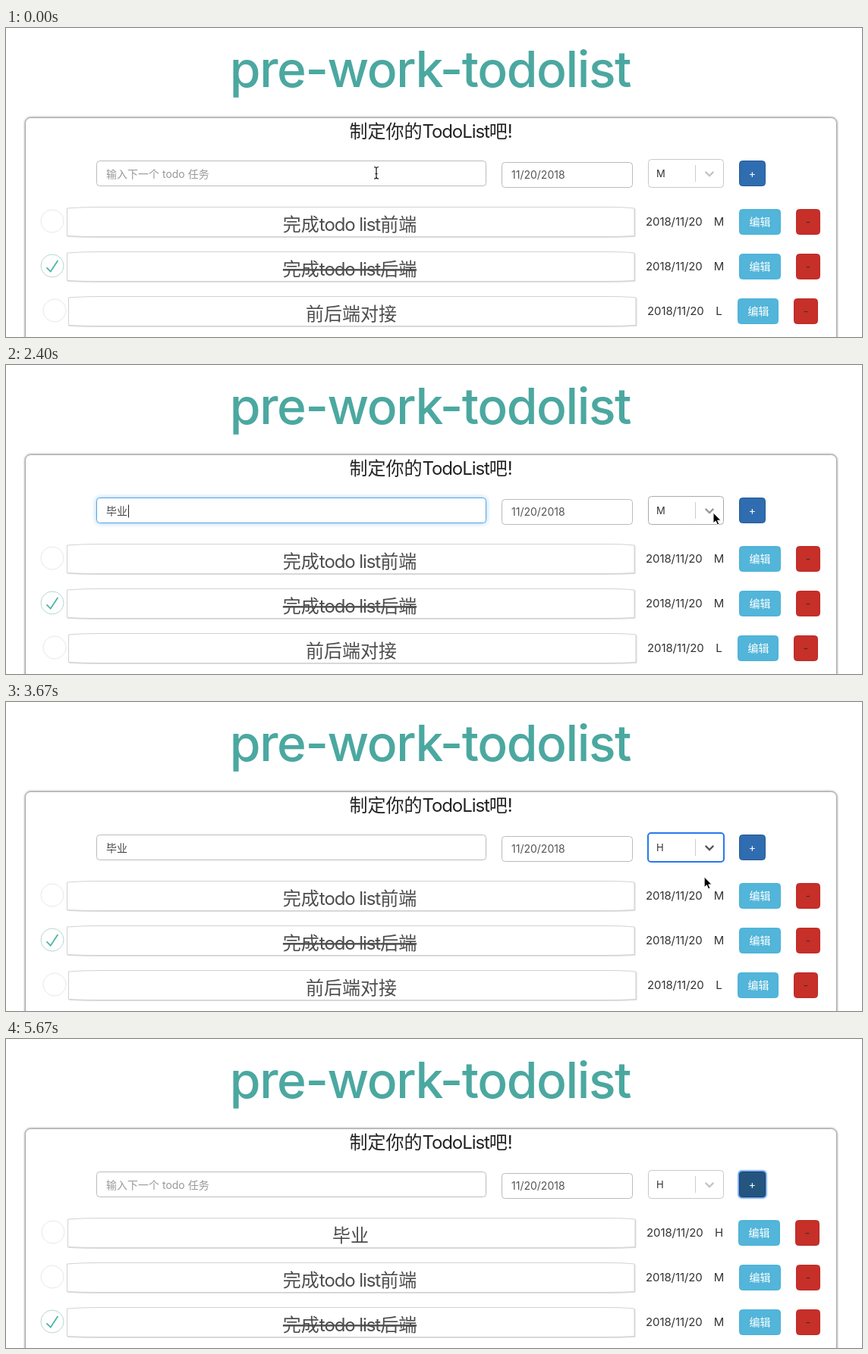
These frames come from a looping animation (1128x408 px, 5.74 s). An HTML page:

```html
<!DOCTYPE html>
<html lang="zh-CN">
<head>
<meta charset="utf-8">
<title>pre-work-todolist</title>
<style>
  html, body { margin: 0; width: 100%; height: 100%; overflow: hidden; background: #fff; }
  svg { display: block; font-family: Inter, "Noto Sans CJK SC", "Noto Sans CJK", sans-serif; }
  .big tspan { letter-spacing: -.045em; }
  .card { filter: drop-shadow(1px 1px .5px #0002); }
  .panel { filter: drop-shadow(0 0 1.5px #0008); }
  .popup { filter: drop-shadow(0 3px 5px #0006); }
  .menu { filter: drop-shadow(0 2px 2px #0003); }
  .focus { filter: drop-shadow(0 0 3px #52a8ec99); }
  .ring { filter: drop-shadow(0 0 1px #4d90fe88); }
</style>
</head>
<body>
<svg id="stage" width="1128" height="408" viewBox="0 0 1128 408"></svg>
<script>
const LOOP = 5740, FPS = 15;
const TEAL = '#4ba8a0', INK = '#333';
const FOCUS = 330, OPEN = 2530, PICK = 3460, PRESS = 4460, ADD = 4590, LEAVE = 5520;

// [time, input text, caret x, candidates]; V and N are pictograms
const typing = [
  [0, '', 132.5],
  [730, 'b', 141, '不 吧 把 被 比 部 本 并 别'],
  [870, 'bi', 144.5, '比 V 逼 必 笔 闭 鼻 N 碧'],
  [1070, 'bi y', 156.5, '毕业 比 必 笔 闭 鼻 碧'],
  [1200, 'bi ye', 165, '毕业 比 必 笔 闭 鼻 碧'],
  [1330, '毕业', 161.5],
  [ADD, '', 132.5]
];

// [time, x, y] of the pointer tip
const pointer = [
  [0, 488, 191], [1400, 488, 191], [1530, 510, 193], [1670, 510, 193],
  [2270, 932, 195], [2730, 932, 195], [3070, 908, 237], [3530, 908, 237],
  [4070, 984, 198], [LOOP, 984, 198]
];

const text = (x, y, size, s, fill = INK, extra = '') =>
  `<text x="${x}" y="${y}" font-size="${size}" fill="${fill}" ${extra}>${s}</text>`;
const mid = (x, y, size, s, fill, extra = '') =>
  text(x, y, size, s, fill, 'text-anchor="middle" ' + extra);
const big = (x, y, s, fill, extra = '') =>
  mid(x, y, 24, s.replace(/[ -~]+/g, '<tspan>$&</tspan>'), fill, 'class="big" ' + extra);
const rect = (x, y, w, h, fill, stroke = 'none', r = 4, extra = '') =>
  `<rect x="${x}" y="${y}" width="${w}" height="${h}" rx="${r}" fill="${fill}" stroke="${stroke}" ${extra}/>`;
const path = (d, stroke, width = 1, fill = 'none', extra = '') =>
  `<path d="${d}" fill="${fill}" stroke="${stroke}" stroke-width="${width}" ${extra}/>`;
const chevron = (x, y, size, color, width) =>
  path(`M${x - size} ${y - size / 2}l${size} ${size} ${size} ${-size}`, color, width);

function pointerAt(t) {
  const i = pointer.findIndex(k => k[0] > t);
  const [t0, x0, y0] = pointer[i - 1], [t1, x1, y1] = pointer[i];
  const p = (t - t0) / (t1 - t0), e = p * p * (3 - 2 * p);
  return [x0 + (x1 - x0) * e, y0 + (y1 - y0) * e];
}

function cursor(x, y) {
  const at = `transform="translate(${x} ${y})"`;
  if (x >= 966 && y > 175)
    return path('M-1.5 1Q0-1 1.5 1V7Q3 5.5 4.4 7.2 6 6 7 8 9 7.5 9.3 9.5V12Q9 14 7.5 16.5H0L-1 14-4.5 9Q-3.5 7-1.5 9Z',
      '#111', 1.1, '#fff', at);
  const overText = x < 633 || (x > 653 && x < 826);
  if (overText)
    return path('M-3-7.5Q0-7.5 0-5.5 0-7.5 3-7.5M0-5.5V6M-3 8Q0 8 0 6 0 8 3 8M-1.5 1.5H1.5', '#111', 1.2, 'none', at);
  return path('M0 0V14L3.2 11 5.4 16 7.8 15 5.6 10.2H10Z', '#fff', 1, '#000', at);
}

function row(i, title, size, done) {
  const d = { M: 0, H: 1, L: 2 }[size], wide = Math.floor(d * 1.5);
  return `<g transform="translate(0 ${i * 59})">` +
    `<circle cx="${61 + wide}" cy="255" r="15" fill="none" stroke="${done ? '#b5d8d2' : '#e8e8e8'}"/>` +
    (done ? path('M72 25L42 71 27 56l-4 4 20 20 34-52z', 'none', 0, '#4fb3a5', 'transform="translate(46 240) scale(.3)"') : '') +
    path('M80.5 238Q100 236.5 120 236.5H790Q815 236.5 828 238V274.5Q810 275.5 790 275.5H120Q100 275.5 80.5 274.5Z',
      '#d2d2d2', 1, '#fff', `class="card" transform="translate(${d} 0)"`) +
    big(453 + d, 268, title, '#4d4d4d', done ? 'text-decoration="line-through"' : '') +
    text(843 + d, 261, 15, '2018/11/20', INK, 'letter-spacing="-.1"') +
    mid(939.5, 261, 15, size) +
    rect(966.5 - d, 239.5, 54 - (d >> 1), 33, '#52b5d9', '#4bb2d7') +
    mid(993.5 - d, 261, 14, '编辑', '#fff') +
    rect(1041.5 - wide, 239.5, 31, 33, '#c72f29', '#b92c27') +
    mid(1057 - wide, 261, 14, '-') + '</g>';
}

function candidates(list) {
  const words = list.split(' ');
  let x = 121, items = '';
  words.forEach((word, i) => {
    items += text(x, 224, 11, i + 1, '#777');
    if (word === 'V') {
      items += rect(x + 11, 209.5, 20, 20, '#f08a24', '#d9741a') +
        mid(x + 21, 224, 11, 'VS', '#fff', 'font-weight="700"');
    } else if (word === 'N') {
      items += path(`M${x + 19} 211Q${x + 21} 208 ${x + 23} 211L${x + 24} 219Q${x + 30} 224 ${x + 27} 228H${x + 15}Q${x + 12} 224 ${x + 18} 219Z`,
        '#e5a52c', 1, '#fbc94a');
    } else items += text(x + 10, 226, 16, word, '#111');
    x += word === 'V' ? 45 : word === 'N' ? 44 : 23 + 16 * word.length;
  });
  return rect(114, 207, x - 89, 27, '#fff', 'none', 5, 'class="popup"') +
    rect(118.5, 210.5, 17 + 16 * words[0].length, 20, '#d3e6fb', '#b9d4f3', 3) +
    items + chevron(x + 11, 220, 4.5, '#888', 1.3);
}

function menu(y) {
  const hoverH = y > 223 && y < 257;
  return rect(845.5, 219.5, 101, 110, '#fff', '#ddd', 4, 'class="menu"') +
    (hoverH ? rect(846, 223, 100, 34, '#a5c9fa', 'none', 0) : '') +
    rect(846, 257, 100, 34, '#2076f8', 'none', 0) +
    [...'HML'].map((s, i) => mid(896, 245 + 34 * i, 13, s, s === 'M' ? '#fff' : INK)).join('');
}

function scene(t) {
  const [x, y] = pointerAt(t);
  const [, value, caret, words] = typing.filter(k => k[0] <= t).pop();
  const inputFocus = t >= FOCUS && t < OPEN;
  const selectFocus = t >= OPEN && t < PRESS;
  const overSelect = x > 846 && x < 946 && y < 211;
  const pressed = t >= PRESS, overButton = x >= 966;
  const hidden = (t >= 730 && t < 1400) || t >= LEAVE;

  const rows = [['完成todo list前端', 'M'], ['完成todo list后端', 'M', true], ['前后端对接', 'L']];
  if (t >= ADD) rows.unshift(['毕业', 'H']);

  return mid(559, 78, 66, 'pre-work-todolist', TEAL, 'font-weight="500" letter-spacing="-1.4"') +
    rect(25.5, 118.5, 1069, 320, '#fff', '#aaa', 7, 'class="panel"') +
    big(559.5, 145, '制定你的TodoList吧!', '#222') +
    rect(119.5, 175.5, 513, 33, '#fff', inputFocus ? '#5aa5dc' : '#bbb', 4, inputFocus ? 'class="focus"' : '') +
    (value
      ? text(132, 198, 14, value, '#444', words ? 'text-decoration="underline"' : '')
      : text(132, 198, 14, '输入下一个 todo 任务', '#999')) +
    (inputFocus ? path(`M${caret} 184.5V201.5`, '#222') : '') +
    rect(653.5, 177.5, 172, 33, '#fff', '#bbb') +
    text(666, 199, 14, '11/20/2018', '#555') +
    (selectFocus
      ? rect(846, 173, 100, 38, '#fff', '#2579ee', 4, 'stroke-width="2"')
      : rect(846.5, 173.5, 99, 37, '#fff', overSelect ? '#aaa' : '#c8c8c8')) +
    text(857, 197, 13, t < PICK ? 'M' : 'H') +
    path('M908.5 181V203', '#ccc') +
    chevron(927, 192.5, 5.3, selectFocus ? '#555' : overSelect ? '#999' : '#c4c4c4', 2.2) +
    (pressed ? rect(965.5, 174.5, 36, 35, '#22527f', '#6fa8f5', 4, 'stroke-width="2" class="ring"') : '') +
    (pressed || overButton
      ? rect(966.5, 175.5, 34, 33, '#24557f', '#1d4469')
      : rect(966.5, 175.5, 34, 33, '#2f6cb0', '#265a95')) +
    mid(983.5, 197, 14, '+', '#fff') +
    rows.slice(0, 3).map((r, i) => row(i, ...r)).join('') +
    (words ? candidates(words) : '') +
    (t >= OPEN && t < PICK ? menu(y) : '') +
    (hidden ? '' : cursor(x, y));
}

const stage = document.getElementById('stage');
let shown = -1;
function tick() {
  const step = Math.floor((performance.now() % LOOP + 4) * FPS / 1000);
  if (step !== shown) {
    shown = step;
    stage.innerHTML = scene(Math.min(step * 1000 / FPS, LOOP - 1));
  }
  requestAnimationFrame(tick);
}
tick();
</script>
</body>
</html>
```
